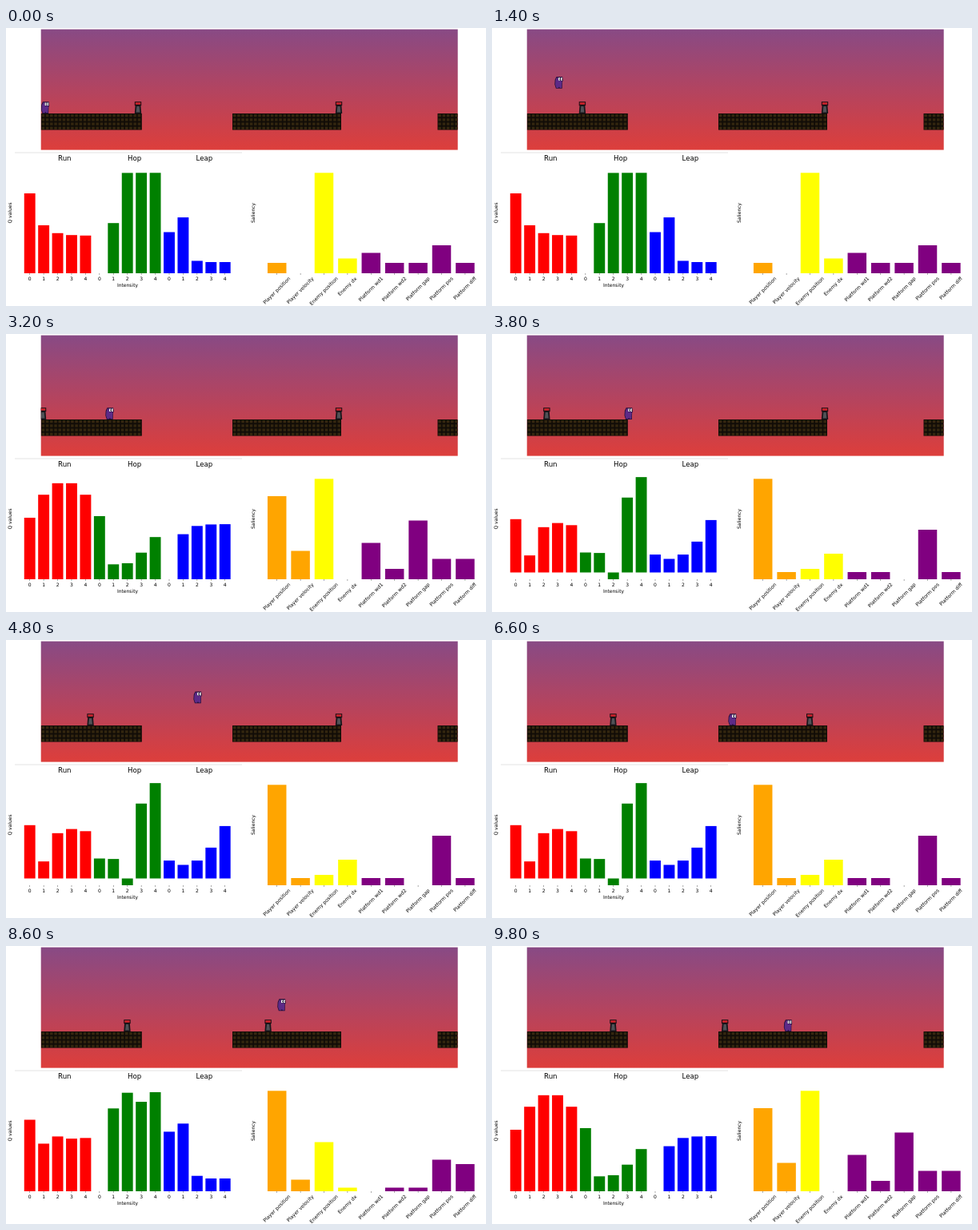
These frames come from a looping animation (600x348 px, 10 s). An HTML page with a canvas:

```html
<!DOCTYPE html>
<html lang="en">
<head>
<meta charset="utf-8">
<title>Platform agent</title>
<style>
  html, body { margin: 0; width: 100%; height: 100%; overflow: hidden; background: #fff; }
  canvas { display: block; width: 600px; height: 348px; }
</style>
</head>
<body>
<canvas id="stage" width="600" height="348"></canvas>
<script>
const ctx = document.getElementById('stage').getContext('2d');
const { exp, cos, min, max, abs, floor, PI, SQRT1_2 } = Math;
const LOOP = 10000, STEP = 200;
const GAME = { x: 43.7, y: 1.6, w: 521, h: 151 };
const GROUND = 107, AXIS = 307, FULL = 125.7;
const HOP_TIME = 2600, HOP_HEIGHT = 31.5;

const bell = (i, center, sharpness) => exp(-sharpness * (i - center) ** 2);
const sigmoid = x => 1 / (1 + exp(-x));

// Each state: height of a bar at intensity i per action, and the salient
// features (by index) that stand out from a common level.
const beforeEnemy = {
  actions: [
    i => 47 + 53 * exp(-1.4 * i),
    i => min(FULL, 62.8 * i),
    i => 14 + 77 * bell(i, 0.6, 2)
  ],
  level: 13,
  peaks: { 1: 0, 2: FULL, 3: 18.5, 4: 25.5, 7: 35 }
};
const beforeGap = {
  actions: [
    i => 70 - 2.7 * i - 47 * bell(i, 1.1, 2.2),
    i => 25 + 95 * sigmoid(4 * (i - 2.75)) - 38 * bell(i, 2, 4),
    i => 17 + 5.4 * (i - 1) ** 2
  ],
  level: 9,
  peaks: { 0: FULL, 2: 13, 3: 32, 6: 0, 7: 62 }
};
const afterGap = {
  actions: [
    i => 66.5 + 23 * exp(-1.2 * i) * cos(PI * i),
    i => (118 + 6 * cos(PI * i)) * (1 - exp(-2.6 * i)),
    i => 16 + 95 * bell(i, 0.55, 1.6)
  ],
  level: 4.5,
  peaks: { 0: FULL, 1: 14.5, 2: 61.5, 4: 0, 7: 39.5, 8: 34 }
};
const clearPath = {
  actions: [
    i => 122 - 7.2 * (i - 2.5) ** 2,
    i => 8 + 2.8 * i * i + 71 * exp(-2.2 * i),
    i => 69 * (1 - exp(-1.7 * i))
  ],
  level: 25.5,
  peaks: { 0: 104, 1: 35.5, 2: FULL, 3: 0, 4: 45.5, 5: 13, 6: 73.5 }
};

function stateAt(t) {
  if (t < 3000) return beforeEnemy;
  if (t < 3800) return clearPath;
  if (t < 6800) return beforeGap;
  return t < 9400 ? afterGap : clearPath;
}

const actionNames = ['Run', 'Hop', 'Leap'];
const actionColors = ['#f00', '#008000', '#00f'];
const features = ['Player position', 'Player velocity', 'Enemy position', 'Enemy dx',
  'Platform wd1', 'Platform wd2', 'Platform gap', 'Platform pos', 'Platform diff'];
const featureColors = ['#ffa500', '#ff0', '#800080'];

const hop = (start, from, to) => ({ start, end: start + HOP_TIME, from, to, hops: true });
const run = (start, end, from, to) => ({ start, end, from, to });
const moves = [hop(200, 49, 102), run(2800, 3950, 102, 181), hop(3950, 181, 300.5),
  hop(6750, 300.5, 350.5), run(9350, 9800, 350.5, 370)];

function playerAt(t) {
  const move = moves.findLast(m => m.start <= t) || moves[0];
  const u = max(0, min(1, (t - move.start) / (move.end - move.start)));
  const progress = move.hops ? 1 - (1 - u) ** 1.7 : u;
  return {
    x: move.from + (move.to - move.from) * progress,
    lift: move.hops ? HOP_HEIGHT * 4 * u * (1 - u) : 0
  };
}

// Walks left, turns at the wall and walks back; active only between start and end.
function patrol(t, { start, end, from, wall, speed }) {
  const walked = speed * (max(start, min(end, t)) - start);
  return wall + abs(from - wall - walked);
}
const enemies = [
  { start: 0, end: 6034, from: 165, wall: 46, speed: 0.0372 },
  { start: 6060, end: LOOP, from: 416, wall: 288.5, speed: 0.0348 }
];

function rect(color, x, y, w, h) {
  ctx.fillStyle = color;
  ctx.fillRect(x, y, w, h);
}

function polygon(color, points) {
  ctx.beginPath();
  points.forEach(([x, y]) => ctx.lineTo(x, y));
  ctx.fillStyle = color;
  ctx.fill();
}

function text(str, x, y, size, angle = 0, baseline = 'alphabetic') {
  ctx.save();
  ctx.translate(x, y);
  ctx.rotate(angle);
  ctx.font = size + 'px "DejaVu Sans", sans-serif';
  ctx.textAlign = 'center';
  ctx.textBaseline = baseline;
  ctx.fillStyle = '#000';
  ctx.fillText(str, 0, 0);
  ctx.restore();
}

function drawPlatform(left, right) {
  const brick = 5.22;
  rect('#110c07', left, GROUND, right - left, 4 * brick - 0.3);
  for (let x = left; x < right - 1; x += brick)
    for (let row = 0; row < 4; row++)
      rect('#33260f', x + 0.9, GROUND + 1 + row * brick, min(3.5, right - x - 1), 3.3);
}

function drawEnemy(x) {
  ctx.save();
  ctx.translate(x, GROUND);
  rect('#1a0f13', -4.2, -14.8, 8.4, 5);
  rect('#cf222b', -3.2, -13.8, 6.4, 2.6);
  polygon('#19161b', [[-3.4, -10], [3.4, -10], [4.2, 0], [-4.2, 0]]);
  polygon('#505156', [[-1.6, -9], [1.6, -9], [2.4, -1.4], [-2.4, -1.4]]);
  ctx.restore();
}

function drawPlayer({ x, lift }) {
  ctx.save();
  ctx.translate(x, GROUND - lift);
  polygon('#24103a', [[-3, -14.8], [4.6, -14.8], [5.2, -10], [4.4, -8], [4.2, 0],
    [-3.6, 0], [-5.2, -5], [-4.8, -11]]);
  polygon('#5c2a87', [[-2.4, -13.8], [-0.8, -13.8], [-0.4, -9.6], [4, -9.4], [3.5, -0.7],
    [1.4, -0.7], [0.4, -2.2], [-0.6, -0.7], [-3, -0.7], [-4.4, -5], [-4, -10.6]]);
  for (const eye of [-0.4, 2.4]) {
    rect('#fff', eye, -13.5, 1.9, 3.5);
    rect('#222', eye + 1, -12.3, 0.8, 1.2);
  }
  ctx.restore();
}

function drawGame(t) {
  const sky = ctx.createLinearGradient(0, GAME.y, 0, GAME.y + GAME.h);
  sky.addColorStop(0, '#884a85');
  sky.addColorStop(1, '#dd3e3b');
  rect(sky, GAME.x, GAME.y, GAME.w, GAME.h);
  ctx.save();
  ctx.beginPath();
  ctx.rect(GAME.x, GAME.y, GAME.w, GAME.h);
  ctx.clip();
  drawPlatform(GAME.x, 169.8);
  drawPlatform(283, 419);
  drawPlatform(539.5, GAME.x + GAME.w);
  enemies.forEach(enemy => drawEnemy(patrol(t, enemy)));
  drawPlayer(playerAt(t));
  ctx.restore();
}

function drawBar(color, x, width, base, height) {
  rect('#555', x - 0.25, AXIS, 0.5, 2);
  rect(color, x - width / 2, base - height, width, height);
}

function drawQChart({ actions }) {
  const heights = actions.flatMap(action => [0, 1, 2, 3, 4].map(action));
  const base = AXIS + min(0, ...heights);
  rect('#ddd', 11, 155.6, 284, 0.8);
  actionNames.forEach((name, i) => text(name, 73.3 + 87.3 * i, 166.3, 8.6));
  heights.forEach((height, i) => {
    const x = 29.7 + 17.43 * i;
    drawBar(actionColors[floor(i / 5)], x, 13.9, base, height);
    text(i % 5, x, 315.8, 6);
  });
  text('Intensity', 152, 323.8, 6);
  text('Q values', 6.5, 231.5, 6, -PI / 2);
}

function drawSaliencyChart({ level, peaks }) {
  features.forEach((name, i) => {
    const x = 338.7 + 29.4 * i;
    drawBar(featureColors[min(2, i >> 1)], x, 23.5, AXIS, peaks[i] ?? level);
    ctx.font = '6.1px "DejaVu Sans", sans-serif';
    const extent = (ctx.measureText(name).width + 7) * SQRT1_2;
    text(name, x, 310.5 + extent / 2, 6.1, -PI / 4, 'middle');
  });
  text('Saliency', 311, 231.5, 6, -PI / 2);
}

function render() {
  const t = floor(performance.now() % LOOP / STEP) * STEP;
  rect('#fff', 0, 0, 600, 348);
  drawGame(t);
  drawQChart(stateAt(t));
  drawSaliencyChart(stateAt(t));
  requestAnimationFrame(render);
}
render();
</script>
</body>
</html>
```
